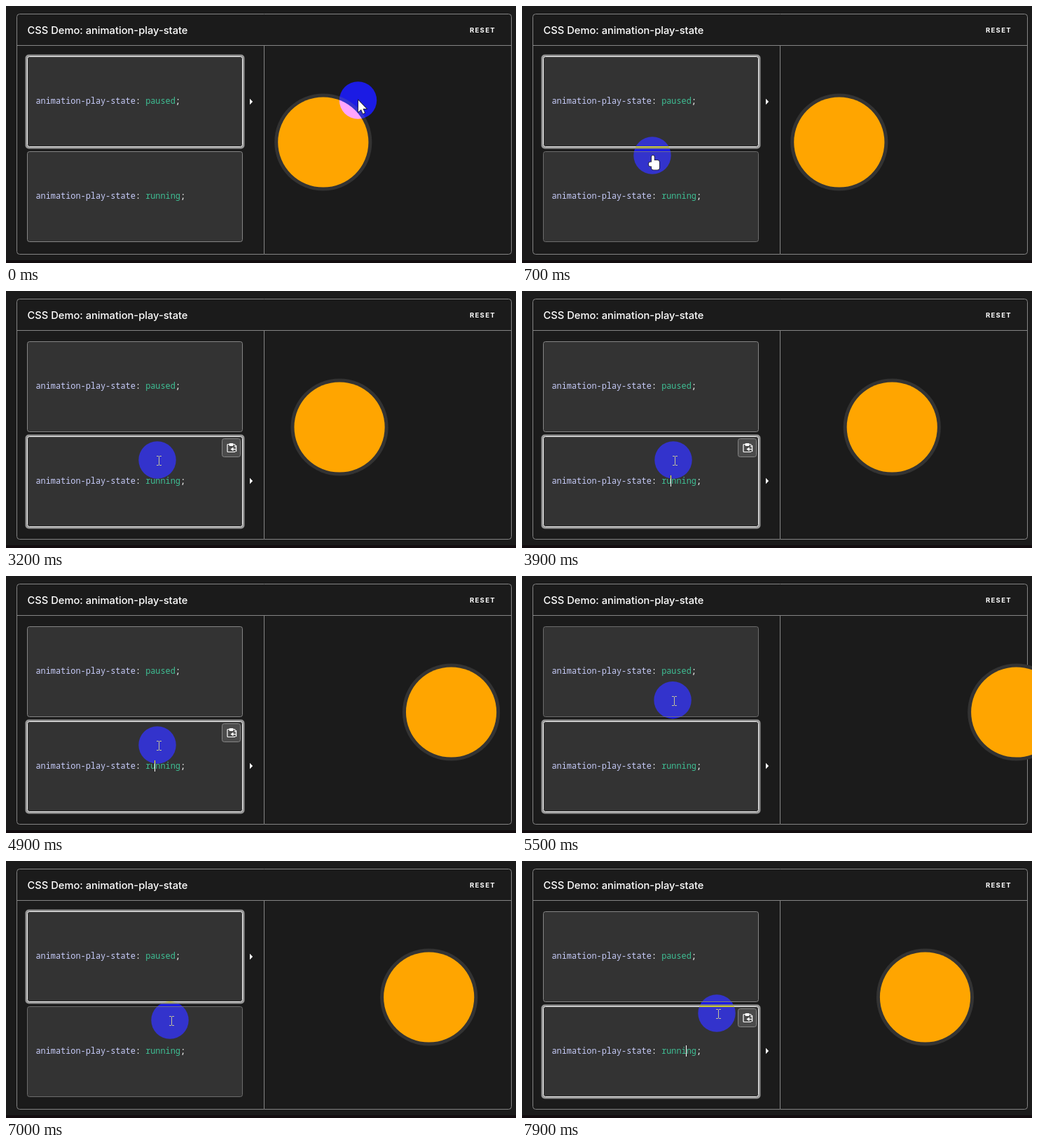
Animation of 728 by 368 pixels, one loop 8 s. Source, as an HTML page with a canvas:

```html
<!DOCTYPE html>
<html lang="en">
<head>
<meta charset="utf-8">
<title>animation-play-state</title>
<style>
html, body { margin: 0; width: 100%; height: 100%; overflow: hidden; background: #1b1b1b; }
canvas { display: block; }
</style>
</head>
<body>
<canvas id="stage" width="728" height="368"></canvas>
<script>
const ctx = document.getElementById('stage').getContext('2d');
const LOOP = 8000, STEP = 100;
const LINE = '#858585', WHITE = '#fff', PANEL = '#333', BUTTON = '#4b4b4b';
const CODE_X = 42.5, CHAR = 7.12;
const PRESS = 100, BLINK = 1200, SLIDE = 3000, DISTANCE = 258;

const boxes = [
  { y: 72, word: 'paused', arrow: 137 },
  { y: 208, word: 'running', arrow: 272 }
];

// Each click selects a box; its caret appears at the press
const clicks = [
  { at: 2465, box: 1, col: 24 },
  { at: 6297, box: 0, col: 24 },
  { at: 7646, box: 1, col: 27 }
];

const moves = [
  { from: 0, to: 700, x: 186, y: 214 },
  { from: 700, to: 1100, x: 210, y: 246 },
  { from: 2000, to: 2400, x: 216, y: 242 },
  { from: 5000, to: 5600, x: 215, y: 161 },
  { from: 6400, to: 7000, x: 234, y: 228 },
  { from: 7600, to: 7900, x: 278, y: 218 }
];

const clamp = v => Math.max(0, Math.min(1, v));
const smooth = k => k * k * (3 - 2 * k);

// The pointer swings sideways first, then up or down
function pointerAt(t) {
  let x = 502.5, y = 135;
  for (const m of moves) {
    const k = smooth(clamp((t - m.from) / (m.to - m.from)));
    x += (m.x - x) * k;
    y += (m.y - y) * k ** 3;
  }
  return [x, y];
}

// cubic-bezier(.42, 0, 1, 1), solved by bisection
function easeIn(p) {
  let lo = 0, hi = 1;
  for (let i = 0; i < 24; i++) {
    const s = (lo + hi) / 2;
    if (1.26 * s + 0.48 * s * s - 0.74 * s ** 3 < p) lo = s; else hi = s;
  }
  return smooth(lo);
}

function ballX(t) {
  const run = clicks.reduce((sum, c) => sum + Math.max(0, t - c.at) * (c.box ? 1 : -1), 0);
  const p = run / SLIDE;
  return 452.8 + DISTANCE * easeIn(1 - Math.abs(1 - p));
}

function rect(x, y, w, h, r, fill, stroke, width = 1) {
  ctx.beginPath();
  ctx.roundRect(x, y, w, h, r);
  if (fill) { ctx.fillStyle = fill; ctx.fill(); }
  if (stroke) { ctx.strokeStyle = stroke; ctx.lineWidth = width; ctx.stroke(); }
}

function bar(x, y, w, h, fill) {
  ctx.fillStyle = fill;
  ctx.fillRect(x, y, w, h);
}

function disc(x, y, r, fill) {
  ctx.beginPath();
  ctx.arc(x, y, r, 0, Math.PI * 2);
  ctx.fillStyle = fill;
  ctx.fill();
}

function triangle(x, y, w, h) {
  ctx.beginPath();
  ctx.moveTo(x, y - h);
  ctx.lineTo(x + w, y);
  ctx.lineTo(x, y + h);
  ctx.fillStyle = WHITE;
  ctx.fill();
}

function text(str, x, y, font, fill, spacing = 0) {
  ctx.font = font;
  ctx.letterSpacing = spacing + 'px';
  ctx.fillStyle = fill;
  ctx.fillText(str, x, y);
}

function frame() {
  bar(0, 0, 728, 368, '#1b1b1b');
  bar(0, 364, 728, 4, '#130d10');
  rect(15.5, 11.5, 706, 344, 4, null, LINE);
  bar(16, 56, 705, 1, LINE);
  bar(368, 57, 1, 298, LINE);
  text('CSS Demo: animation-play-state', 30.5, 39.5, '500 14.7px Inter, sans-serif', WHITE);
  text('RESET', 662, 38, '700 9.5px Inter, sans-serif', WHITE, 1.3);
}

function pasteButton(y) {
  rect(308.5, y + 0.5, 26, 26, 3, BUTTON, LINE);
  ctx.save();
  ctx.translate(315, y + 7);
  rect(1, 1.5, 11, 11, 1, null, WHITE, 1.2);
  rect(3.5, 0, 6, 4, 1, WHITE);
  bar(6.5, 5.8, 7, 5.4, BUTTON);
  bar(8, 7.9, 6, 1.3, WHITE);
  bar(13, 3, 1.2, 9, WHITE);
  triangle(9.5, 8.5, -4, 3);
  ctx.restore();
}

function codeBox({ y, word, arrow }, selected, hovered) {
  if (selected) {
    rect(27.5, y - 2.5, 313, 135, 5, '#949494');
    rect(30.5, y + 0.5, 307, 129, 3, PANEL, '#f4f4f4');
    triangle(348, arrow, 4.2, 4.3);
  } else {
    rect(30.5, y + 0.5, 307, 129, 3, PANEL, hovered ? '#6c6c6c' : LINE);
  }
  const font = '500 11.87px "Noto Sans Mono", monospace';
  const put = (str, col, fill) => text(str, CODE_X + col * CHAR, y + 67.5, font, fill);
  put('animation-play-state', 0, '#c8cdfb');
  put(':', 20, WHITE);
  put(word, 22, '#3fc095');
  put(';', 22 + word.length, WHITE);
  if (selected && hovered) pasteButton(y + 3);
}

function carets(t) {
  clicks.forEach(({ at, box, col }, i) => {
    const age = t - at + PRESS, end = clicks[i + 1]?.at ?? LOOP;
    if (age < 0 || t >= end || age % BLINK >= BLINK / 2) return;
    bar(Math.round(CODE_X + col * CHAR - 1), boxes[box].y + 56, 1, 16, WHITE);
  });
}

const arrowShape = new Path2D('M0 0V16.5L4 13L6.5 19L9 18L6.5 12H11.5Z');

const handShape = new Path2D();
handShape.roundRect(-1, 0, 3.8, 14, 1.9);
handShape.roundRect(-1, 7, 11, 13.5, 3);
handShape.roundRect(-5, 9.5, 6, 6, 2.5);

function outlined(shape) {
  ctx.strokeStyle = '#222';
  ctx.lineWidth = 1.6;
  ctx.stroke(shape);
  ctx.fillStyle = WHITE;
  ctx.fill(shape);
}

function textCursor() {
  const tint = '#c6c69a';
  bar(2, -5, 1, 12, tint);
  for (const y of [-6, 7]) {
    bar(-1, y, 3, 1, tint);
    bar(3, y, 3, 1, tint);
  }
}

function pointer(x, y, box) {
  ctx.save();
  ctx.globalCompositeOperation = 'difference';
  disc(x, y, 26.7, '#00f');
  ctx.globalCompositeOperation = 'source-over';
  ctx.translate(Math.round(x), Math.round(y));
  if (!box) outlined(arrowShape);
  else if (Math.abs(y - box.y - 65) > 57) outlined(handShape);
  else textCursor();
  ctx.restore();
}

function draw(t) {
  const [x, y] = pointerAt(t);
  const active = boxes[clicks.findLast(c => c.at <= t)?.box ?? 0];
  const hover = boxes.find(b => x >= 30 && x < 338 && y >= b.y && y < b.y + 130);
  frame();
  for (const b of boxes) codeBox(b, b === active, b === hover);
  carets(t);
  const bx = ballX(t);
  disc(bx, 195, 69.6, PANEL);
  disc(bx, 195, 64.6, '#ffa500');
  pointer(x, y, hover);
}

const start = performance.now();
function tick() {
  const t = (performance.now() - start) % LOOP;
  draw(Math.floor(t / STEP) * STEP);
  requestAnimationFrame(tick);
}
tick();
</script>
</body>
</html>
```
